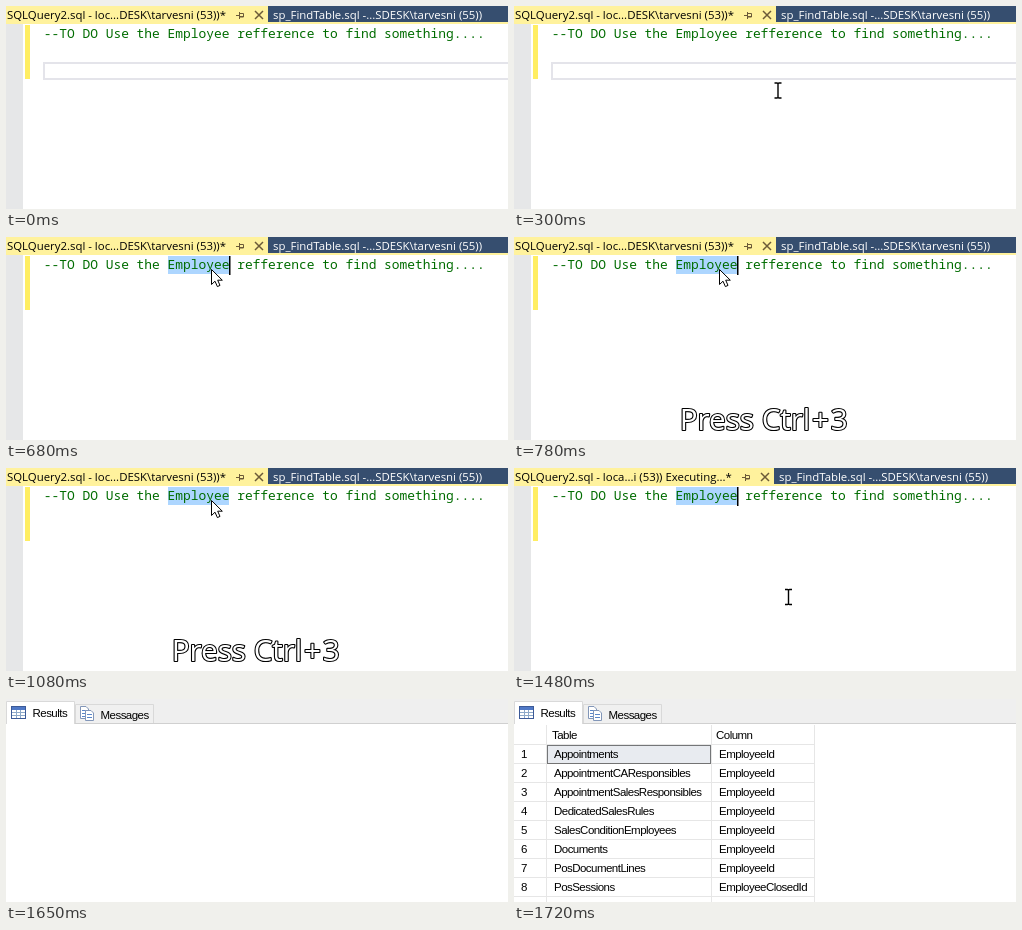
Write an HTML page that moves like this. It is 502 px wide and 203 px high and loops after 2.42 s.

```html
<!DOCTYPE html>
<html lang="en">
<head>
<meta charset="utf-8">
<title>Find references query</title>
<style>
  html, body { margin: 0; width: 100%; height: 100%; overflow: hidden; background: #fff; }
  svg { display: block; width: 502px; height: 203px; }
  text { white-space: pre; }
  .tab { font: 11.4px "Open Sans", sans-serif; }
  .code { font: 12.9px "Noto Sans Mono", monospace; fill: #006c00; }
  .hint { font: 500 29.6px "Open Sans", sans-serif; fill: #fff; stroke: #000; stroke-width: 2.2; stroke-linejoin: round; paint-order: stroke; }
  .grid { font: 11.5px "Liberation Sans", Arial, sans-serif; letter-spacing: -.53px; fill: #000; }
</style>
</head>
<body>
<svg viewBox="0 0 502 203" xmlns="http://www.w3.org/2000/svg">
  <rect width="502" height="203" fill="#fff"/>

  <g id="editor">
    <rect width="502" height="18" fill="#fff29d"/>
    <text id="title" class="tab" x="1" y="13"></text>
    <g id="tabs">
      <rect x="262" width="250" height="16" fill="#364e6f"/>
      <path d="M230 9.5H233M233.5 6V13M234 7.5H237.5V11H234M234 10.5H237" fill="none" stroke="#6b5a38"/>
      <path d="M249 5L257 13M257 5L249 13" stroke="#6b5a38" stroke-width="1.5"/>
      <text class="tab" x="267" y="13" fill="#fff">sp_FindTable.sql -...SDESK\tarvesni (55))</text>
    </g>
    <rect y="18" width="17" height="185" fill="#e6e7e8"/>
    <rect x="19" y="19" width="5" height="54" fill="#ffee62"/>
    <rect id="line" x="38" y="57" width="480" height="16" fill="none" stroke="#e4e4ea" stroke-width="2"/>
    <rect id="selection" x="162" y="19" width="61" height="18" fill="#add6ff"/>
    <text class="code" x="37.8" y="32">--TO DO Use the Employee refference to find something....</text>
    <rect id="caret" x="223" y="19" width="1.5" height="19" fill="#000"/>
    <path id="beam" d="M-3.5 -7.5H-1Q0 -7.5 0 -6.5Q0 -7.5 1 -7.5H3.5M0 -6.5V6.5M-3.5 7.5H-1Q0 7.5 0 6.5Q0 7.5 1 7.5H3.5" fill="none" stroke="#000" stroke-width="1.4"/>
    <path id="arrow" d="M205.5 32.5V47.5L209 44.2L211.4 49.6L214 48.4L211.7 43.2H216.3Z" fill="#fff" stroke="#000"/>
    <text id="hint" class="hint" x="165.8" y="193">Press Ctrl<tspan dx="1.7">+</tspan><tspan dx="1.7">3</tspan></text>
  </g>

  <g id="results">
    <rect width="502" height="24" fill="#efefef"/>
    <path d="M0 24.5H502" stroke="#d0d0d0"/>
    <g id="panes">
      <path d="M69.5 24V5.5H147.5V24" fill="#f0f0f0" stroke="#d9d9d9"/>
      <path d="M.5 25V2.5H68.5V25" fill="#fff" stroke="#d9d9d9"/>
      <rect x="1" y="24" width="67" height="2" fill="#fff"/>
      <rect x="5.5" y="7.5" width="14" height="12" fill="#fff" stroke="#3c5a97"/>
      <rect x="6" y="8" width="13" height="3" fill="#4f78c6"/>
      <path d="M6 13.5H19M6 16.5H19M10.5 11V19M14.5 11V19" stroke="#8da9c9"/>
      <path d="M74.5 7.5H80L82.5 10V19.5H74.5Z" fill="#fff" stroke="#8296b8"/>
      <path d="M76 11.5H80M76 14.5H80M76 17.5H80" stroke="#5b86c8"/>
      <path d="M79.5 11.5H85L87.5 14V21.5H79.5Z" fill="#fff" stroke="#8296b8"/>
      <path d="M81 15.5H86M81 18.5H86" stroke="#5b86c8"/>
      <text class="grid" x="26.5" y="18">Results</text>
      <text class="grid" x="94.5" y="20">Messages</text>
    </g>
    <g id="rows"></g>
  </g>
</svg>
<script>
const LOOP = 2420;
const $ = id => document.getElementById(id);
const show = (id, on) => { $(id).style.display = on ? "" : "none"; };

const names = ["Appointments", "AppointmentCAResponsibles", "AppointmentSalesResponsibles",
  "DedicatedSalesRules", "SalesConditionEmployees", "Documents", "PosDocumentLines",
  "PosSessions", "PosGroups"];

function buildRows() {
  const cell = (x, y, s) => `<text class="grid" x="${x}" y="${y}">${s}</text>`;
  let out = '<rect x="33" y="46" width="164" height="18" fill="#e8ebf0"/>';
  let lines = "M32.5 26V203M197.5 26V203M300.5 26V203";
  out += cell(38, 40, "Table") + cell(202, 40, "Column");
  names.forEach((name, i) => {
    const y = 58.8 + i * 19;
    lines += `M0 ${45.5 + i * 19}H300`;
    out += cell(7, y, i + 1) + cell(40, y, name)
      + cell(205, y, name === "PosSessions" ? "EmployeeClosedId" : "EmployeeId");
  });
  out += `<path d="${lines}" stroke="#e6e6e6"/>`;
  out += '<rect x="33.5" y="46.5" width="163" height="18" fill="none" stroke="#000" stroke-dasharray="1 1"/>';
  $("rows").innerHTML = out;
}

function placeBeam(t) {
  if (t >= 1480) return [274.5, 129];
  const k = Math.max(0, Math.min(4, Math.floor((t - 70) / 77.5))) / 4;
  const e = k * k * (3 - 2 * k);
  return [320 - 112 * e, 135 - 101 * e];
}

function draw(t) {
  const running = t >= 1480, done = t >= 1570;
  show("editor", !done);
  show("results", done);
  show("panes", t >= 1650);
  show("rows", t >= 1720);
  show("line", t < 530);
  show("selection", t >= 680);
  show("caret", t >= 680 && (t < 1080 || running));
  show("arrow", t >= 680 && !running);
  show("hint", t >= 780 && !running);
  show("beam", t >= 70 && t < 680 || running);
  $("beam").setAttribute("transform", `translate(${placeBeam(t)})`);
  $("tabs").setAttribute("transform", `translate(${running ? -2 : 0})`);
  $("title").textContent = running
    ? "SQLQuery2.sql - loca...i (53)) Executing...*"
    : "SQLQuery2.sql - loc...DESK\\tarvesni (53))*";
}

buildRows();
const start = performance.now();
function tick() {
  draw((performance.now() - start) % LOOP);
  requestAnimationFrame(tick);
}
tick();
</script>
</body>
</html>
```
